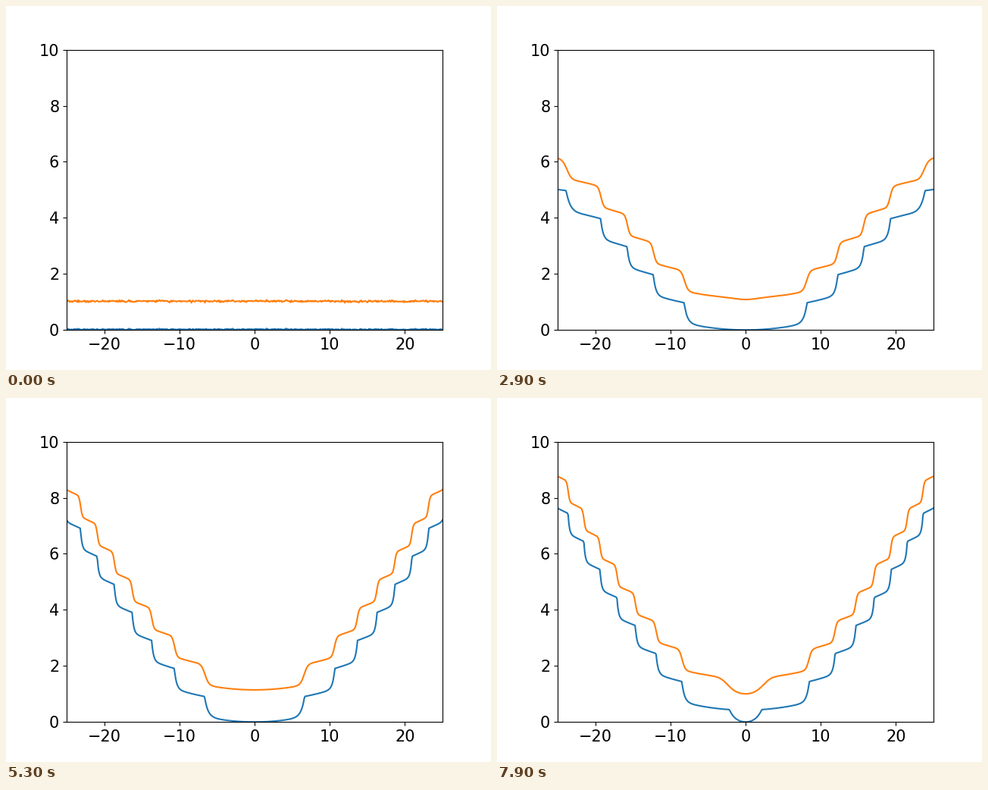
Recreate the animation shown at these times as a matplotlib script. Size 640x480 px, loop 8 s.

```python
import numpy as np
import matplotlib.pyplot as plt
from matplotlib.animation import FuncAnimation

plt.rcParams["font.family"] = "DejaVu Sans"
plt.rcParams["font.size"] = 15

FRAMES, STEP = 80, 100
PERIOD = 1.7 / 3   # seconds per cycle at the centre
DRIFT = 0.27       # share of each unit climbed slowly; the rest is a jump
x = np.linspace(-25, 25, 501)
u2 = (x / 25) ** 2


def logistic(z):
    return 1 / (1 + np.exp(-z))


def saturate(t, rate, cap, sharp):
    """Grow at a steady rate, then level off at cap."""
    rise = rate * t
    return rise / (1 + (rise / cap) ** sharp) ** (1 / sharp)


def low(phase):
    """Slow drift, then a runaway jump that stops dead at each whole phase."""
    n = np.floor(phase)
    f = phase - n
    return n + DRIFT * f + (1 - DRIFT) * np.exp((f - 1) / .082)


def high(phase):
    """The same drift with a rounded jump, one unit further up."""
    n = np.floor(phase)
    f = phase - n
    jump = logistic((f - .988) / .048) + logistic((f + .012) / .048) - 1
    return n + 1.145 + DRIFT * f + (1 - DRIFT) * jump


def lead(t):
    """Phase lead over the centre, flat at the walls while it is growing."""
    bow = saturate(t, 4.12, 9.55, 4)
    edge = saturate(t, 1.75, 7.75, 7)
    d = max(bow - 2 * edge, 0)
    b = bow + d - edge
    return bow * u2 - b * u2 ** 2 + d * u2 ** 3


def curves(i):
    if i == 0:
        noise = np.random.default_rng(4).normal(0, 1, x.size)
        return np.clip(.02 + .012 * noise, 0, None), 1.025 + .018 * noise
    t = i * STEP / 1000
    phase = t / PERIOD - .012 + lead(t)
    blue_y = low(phase)
    base = blue_y.min()
    return blue_y - base, high(phase) - base


fig, ax = plt.subplots(figsize=(6.4, 4.8), dpi=100)
ax.set_xlim(-25, 25)
ax.set_ylim(0, 10)
blue, = ax.plot([], [], color="#1f77b4")
orange, = ax.plot([], [], color="#ff7f0e")


def update(i):
    for line, y in zip((blue, orange), curves(i)):
        line.set_data(x, y)
    return blue, orange


anim = FuncAnimation(fig, update, frames=FRAMES, interval=STEP,
                     repeat=True, repeat_delay=0)
plt.show()
```
